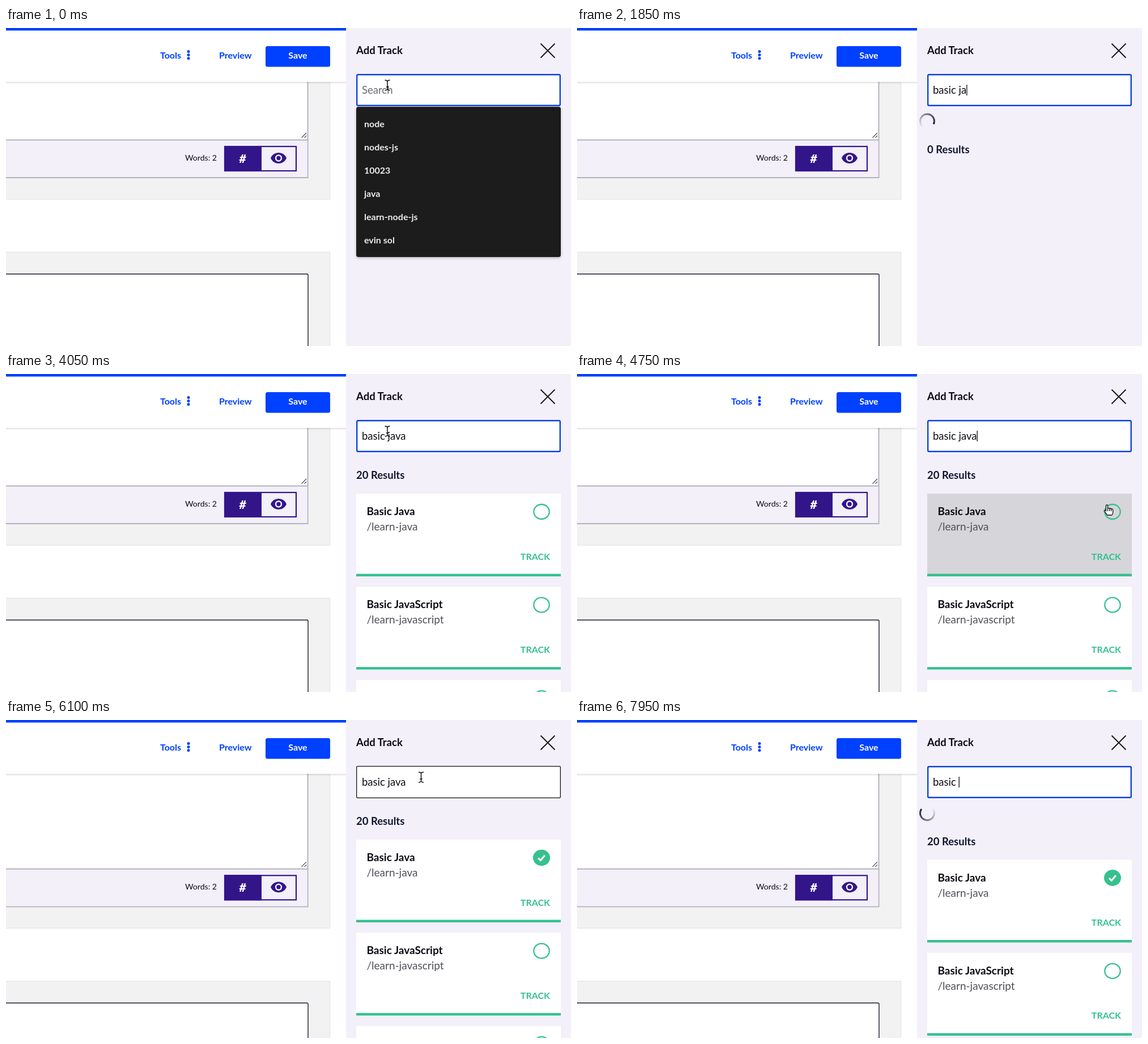
These frames come from a looping animation (997x561 px, 8 s). An HTML page:

```html
<!DOCTYPE html>
<html lang="en">
<head>
<meta charset="utf-8">
<title>Add Track</title>
<style>
html, body { margin: 0; width: 100%; height: 100%; overflow: hidden; background: #fff; }
svg { display: block; width: 100vw; height: 100vh; }
text { font-family: Lato, "Open Sans", sans-serif; white-space: pre; fill: #10162f; }
.b { font-weight: 700; }
.ink { fill: #0c0b14; }
.blue { fill: #0040ff; }
.green { fill: #36c18f; }
.lilac { fill: #f3f0fa; }
.violet { fill: #33158a; }
.t19 { font-size: 19px; }
.t18 { font-size: 18.5px; }
.t16 { font-size: 16px; }
</style>
</head>
<body>
<svg viewBox="0 0 997 561" preserveAspectRatio="none">
  <defs>
    <filter id="soft" x="-10%" y="-20%" width="120%" height="150%">
      <feDropShadow dx="0" dy="2" stdDeviation="2" flood-color="#000" flood-opacity=".25"/>
    </filter>
    <linearGradient id="shade" x2="0" y2="1">
      <stop stop-color="#000" stop-opacity=".13"/><stop offset="1" stop-color="#000" stop-opacity="0"/>
    </linearGradient>
  </defs>
  <rect width="997" height="561" fill="#fff"/>

  <g id="editor">
    <rect x="-5" y="-80" width="576.5" height="382" fill="#f2f2f2" stroke="#e7e7e7" stroke-width="1.5"/>
    <rect x="-5" y="-80" width="537.5" height="344" fill="#fff" stroke="#b4b2bc" stroke-width="2"/>
    <rect x="-5" y="197.5" width="536.5" height="65.5" class="lilac"/>
    <path d="M-5 197.5H532" stroke="#b4b2bc" stroke-width="2"/>
    <path d="M521.5 193.5l8.5-8.5M526.5 193.5l3.5-3.5" stroke="#444" stroke-width="1.1"/>
    <text x="316" y="234" font-size="14.1" class="ink">Words: 2</text>
    <rect x="386" y="209" width="126" height="43" class="lilac" stroke="#33158a" stroke-width="2.2"/>
    <rect x="385" y="208" width="66" height="45" class="violet"/>
    <text x="417.5" y="238" text-anchor="middle" font-size="21" font-weight="900" font-style="italic" style="fill:#fff">#</text>
    <path d="M467 229.5c2.2-5.6 7.600-9.400 14-9.400s11.800 3.800 14 9.400c-2.200 5.600-7.600 9.400-14 9.400s-11.800-3.800-14-9.400z" class="violet"/>
    <circle cx="481" cy="229.500" r="6.200" class="lilac"/>
    <circle cx="481" cy="229.500" r="3.700" class="violet"/>
    <rect x="-5" y="395.500" width="576.500" height="260" fill="#f2f2f2" stroke="#e7e7e7" stroke-width="1.500"/>
    <rect x="-5" y="434" width="538" height="200" rx="2" fill="#fff" stroke="#1e1a33" stroke-width="1.400"/>
  </g>

  <rect y="95" width="600" height="4" fill="url(#shade)"/>
  <rect width="600" height="95" fill="#fff"/>
  <rect width="600" height="4.500" class="blue"/>
  <text x="272" y="54" class="b blue t16">Tools</text>
  <g class="blue">
    <circle cx="322" cy="41.500" r="2.500"/><circle cx="322" cy="47.500" r="2.500"/><circle cx="322" cy="53.500" r="2.500"/>
  </g>
  <text x="376" y="54" class="b blue t16">Preview</text>
  <rect x="458" y="32" width="114" height="36.500" rx="3.500" class="blue"/>
  <text x="515" y="54" text-anchor="middle" class="b t16" style="fill:#fff">Save</text>

  <rect x="600" width="397" height="561" class="lilac"/>
  <text x="618" y="46" class="b ink t18">Add Track</text>
  <path d="M943.500 27.500l25 25M968.500 27.500l-25 25" stroke="#111" stroke-width="1.800"/>
  <rect id="field" fill="#fff" rx="2"/>
  <text id="query" x="628" y="115.500" class="t18"></text>
  <rect id="caret" y="100" width="1.300" height="19" class="ink"/>
  <g id="spinner"></g>
  <text id="count" x="618" class="b t18"></text>
  <g id="cards"></g>
  <g id="menu">
    <rect id="menuBox" x="618" y="139" width="361" rx="4" fill="#1a1a1a" filter="url(#soft)"/>
    <g id="items"></g>
  </g>
  <g id="cursor">
    <path id="beam" d="M-4.500-9q3.500 0 4.500 2q1-2 4.500-2M0-7V7M-4.500 9q3.500 0 4.500-2q1 2 4.500 2M-2.200 3H2.200" fill="none" stroke="#111" stroke-width="1.500"/>
    <path id="arrow" d="M0 0V15L3.500 11.800L6 17.500L8.500 16.400L6 11H11z" fill="#111" stroke="#fff"/>
    <path id="hand" d="M-4.500 2V-7.500q0-1.500 1.500-1.500t1.500 1.500V-2q0-1.500 1.600-1.500T1.700-2q.2-1 1.500-1T4.700-1.300q.3-.9 1.500-.9T7.700-.5V4q0 3-2 5H-2.500Q-4 6-7.500 2.300q-.8-1.600.6-2T-4.500 2zM-1.500-2V2M1.700-2V2M4.700-1.300V2" fill="#fff" stroke="#111" stroke-width="1.300" stroke-linejoin="round"/>
  </g>
</svg>
<script>
const LOOP = 8000, PITCH = 164.4;
const $ = id => document.getElementById(id);
const show = (id, on) => $(id).setAttribute('visibility', on ? 'visible' : 'hidden');
const set = (el, attrs) => { for (const k in attrs) el.setAttribute(k, attrs[k]); };
const clamp = v => Math.max(0, Math.min(1, v));

const phrase = 'basic java';
const typed = [550, 700, 850, 1000, 1150, 1380, 1650, 1800, 2050, 2300];
const erased = [7250, 7430, 7600, 7800];
const BLUR = 4950, FOCUS = 6200, LOADED = 3250, RELOAD = 7300;
const edits = [-500, ...typed, FOCUS, ...erased];
// time, x, y
const path = [[0, 673, 101], [4050, 673, 101], [4600, 938, 240], [5030, 938, 240],
              [5300, 833, 122], [5750, 732.5, 101], [8000, 732.5, 101]];

function card(i, title, slug) {
  const y = 211 + i * PITCH;
  return `<g transform="translate(618 ${y})">
    <rect ${i ? '' : 'id="first"'} width="361" height="146" fill="#fff"/>
    <rect y="141.5" width="361" height="4.500" class="green"/>
    <text x="18.500" y="38" class="b ink t19">${title}</text>
    <text x="18.500" y="65" class="t19" style="fill:#504f59">${slug}</text>
    <ellipse cx="327" cy="32" rx="13.700" ry="13" fill="none" stroke="#36c18f" stroke-width="2.300"/>
    ${i ? '' : `<g id="tick"><ellipse cx="327" cy="32" rx="14.800" ry="14" class="green"/>
      <path d="M321 32.500l4.300 4.300l7.500-9" fill="none" stroke="#fff" stroke-width="3"/></g>`}
    <text x="342" y="116.500" text-anchor="end" class="b green t16">TRACK</text>
  </g>`;
}
$('cards').innerHTML = card(0, 'Basic Java', '/learn-java') +
  card(1, 'Basic JavaScript', '/learn-javascript') + card(2, '', '');

$('items').innerHTML = ['node', 'nodes-js', '10023', 'java', 'learn-node-js', 'evin sol']
  .map((s, i) => `<text x="632" y="${174.5 + i * 41}" class="b t16" style="fill:#ececec">${s}</text>`).join('');

// Fading arc built from short segments, its dark end at angle 0.
let arc = '';
for (let i = 0; i < 30; i++) {
  const at = deg => { const a = deg * Math.PI / 180; return `${12.4 * Math.cos(a)} ${12.4 * Math.sin(a)}`; };
  arc += `<path d="M${at(-i * 8.5 - 9)}A12.4 12.4 0 0 1 ${at(-i * 8.5)}" fill="none" stroke="#10162f" stroke-width="3" opacity="${1 - i / 30}"/>`;
}
$('spinner').innerHTML = arc;

function pointer(t) {
  let i = 0;
  while (i < path.length - 2 && t >= path[i + 1][0]) i++;
  const [a, b] = [path[i], path[i + 1]];
  const u = clamp((t - a[0]) / (b[0] - a[0])), e = u * u * (3 - 2 * u);
  return [a[1] + (b[1] - a[1]) * e, a[2] + (b[2] - a[2]) * e];
}

function draw(t) {
  const past = list => list.filter(k => k <= t).length;
  const text = phrase.slice(0, past(typed) - past(erased));
  const focused = t < BLUR || t >= FOCUS;
  const loading = (t >= 900 && t < LOADED) || t >= RELOAD;
  const drop = loading ? 35.5 : 0;

  $('editor').setAttribute('transform', `translate(0 ${t >= 5150 ? 65.3 : 0})`);
  const w = focused ? 2.4 : 1.3;
  set($('field'), { x: 618 + w / 2, y: 81 + w / 2, width: 361 - w, height: 57 - w,
    stroke: focused ? '#0d44dc' : '#111', 'stroke-width': w });

  const q = $('query');
  q.textContent = text || 'Search';
  q.style.fill = text ? '#0c0b14' : '#6a6973';
  const last = Math.max(...edits.filter(k => k <= t));
  show('caret', focused && (t - last) % 1000 < 500);
  $('caret').setAttribute('x', 628 + (text ? q.getComputedTextLength() : 0));

  const menuOpen = t < typed[5], full = !text;
  show('menu', menuOpen);
  $('menuBox').setAttribute('height', full ? 265 : 60);
  [...$('items').children].forEach((el, i) => {
    el.setAttribute('display', full || i === 4 ? 'inline' : 'none');
    if (i === 4) el.setAttribute('y', full ? 338.5 : 174.5);
  });

  show('spinner', loading);
  const turn = t < LOADED ? 25 + (t - 1850) * .288 : 215 + (t - 7950) * .288;
  $('spinner').setAttribute('transform', `translate(618 164.3) rotate(${turn})`);
  $('count').textContent = t < LOADED ? '0 Results' : '20 Results';
  $('count').setAttribute('y', 185 + drop);
  $('count').setAttribute('display', t < 900 ? 'none' : 'inline');
  $('cards').setAttribute('display', t < LOADED ? 'none' : 'inline');
  $('cards').setAttribute('transform', `translate(0 ${drop})`);
  $('tick').setAttribute('display', t >= BLUR ? 'inline' : 'none');

  const [x, y] = pointer(t);
  const visible = t < typed[0] || (t >= 4050 && t < erased[0]);
  const onCard = visible && t > 4050 && y > 211;
  const inField = y < 138;
  $('first').setAttribute('fill', onCard ? '#d6d5da' : '#fff');
  $('cursor').setAttribute('transform', `translate(${x} ${y})`);
  show('beam', visible && inField);
  show('arrow', visible && !inField && !onCard);
  show('hand', onCard);
}

function tick() {
  draw(performance.now() % LOOP);
  requestAnimationFrame(tick);
}
tick();
</script>
</body>
</html>
```
